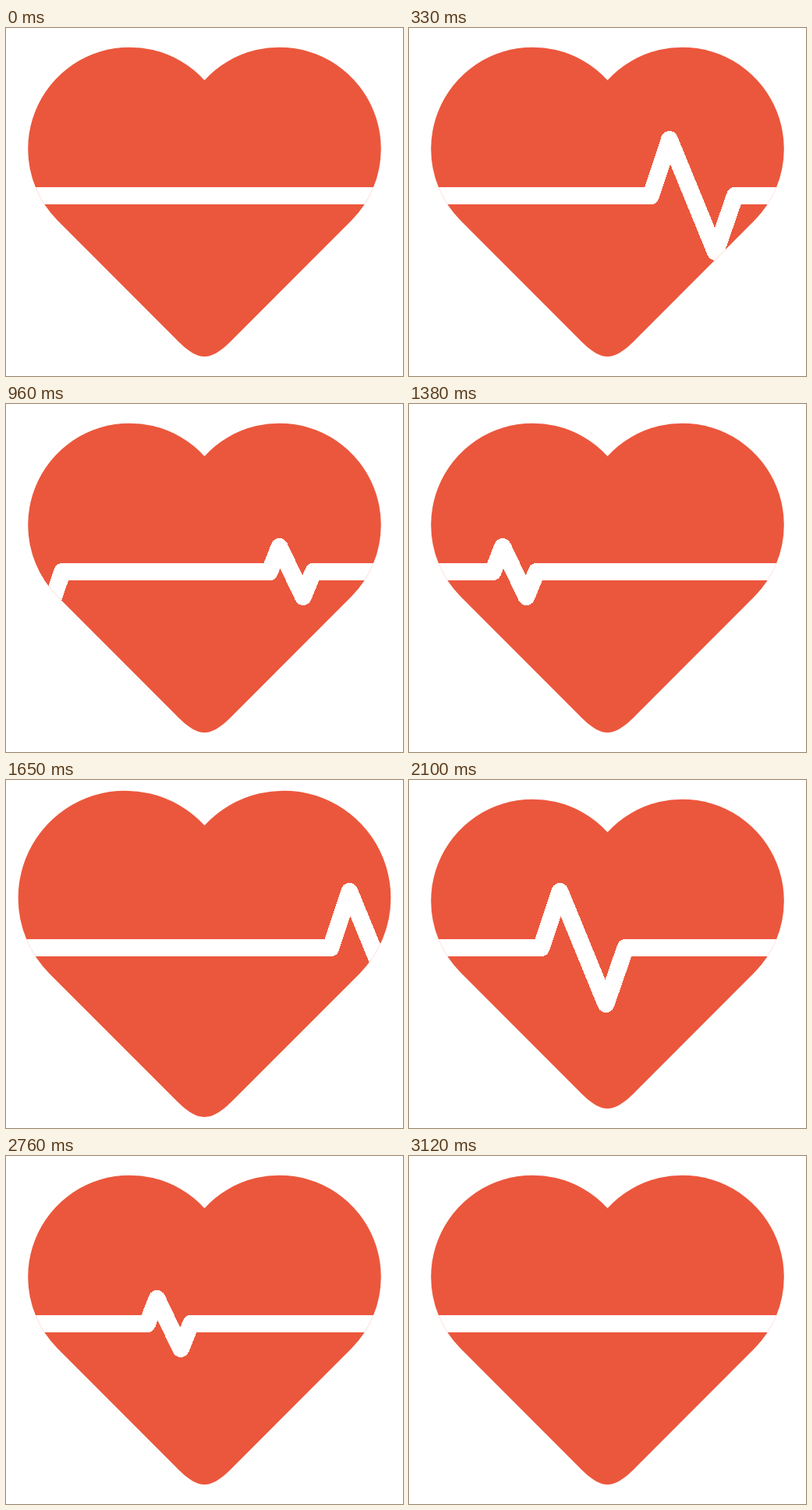
An HTML page that plays this animation: 509x446 px, repeating every 3180 ms.

```html
<!DOCTYPE html>
<html lang="en">
<head>
<meta charset="utf-8">
<title>Heartbeat</title>
<style>
  html, body { margin: 0; width: 100%; height: 100%; overflow: hidden; background: #fff; }
  svg { display: block; width: 100vw; height: 100vh; }
</style>
</head>
<body>
<svg viewBox="0 0 509 446">
  <clipPath id="inside"><use href="#heart"/></clipPath>
  <path id="heart" fill="#eb573c" d="M254.5 66.9
    A130.3 130.3 0 0 1 480.8 155 A130.3 130.3 0 0 1 442.6 247.1 L290 399.8
    C274 416 264 421 254.5 421 C245 421 235 416 219 399.8
    L66.4 247.1 A130.3 130.3 0 0 1 28.2 155 A130.3 130.3 0 0 1 254.5 66.9Z"/>
  <g clip-path="url(#inside)">
    <path id="pulse" fill="none" stroke="#fff" stroke-width="22" stroke-linejoin="round"
      shape-rendering="crispEdges"/>
  </g>
</svg>
<script>
  const STEP = 30, LOOP = 3180, LAST = 104;
  const SPEED = 16.46;                        // pixels per step
  const CENTER = { x: 254.5, y: 223 };
  const BEAT = { period: 25, rise: 3, fall: 4, count: 4, gain: 1 / 9 };

  const heart = document.getElementById('heart');
  const pulse = document.getElementById('pulse');

  // Spikes as [x from the crest, y]
  const BIG = [[-24, 215], [0, 143], [59, 287], [84, 215]];
  const SMALL = [[-12.5, 215], [0, 183], [30.5, 247], [43.5, 215]];
  const spike = (shape, crest) => shape.map(([x, y]) => `L${crest + x} ${y}`).join('');

  const trace = 'M-50 215' + [515, 1345.7].map(x => spike(BIG, x) + spike(SMALL, x + 362.2)).join('') + 'H2400';
  pulse.setAttribute('d', trace);

  function heartScale(step) {
    if (step >= BEAT.period * BEAT.count) return 1;
    const phase = step % BEAT.period;
    const level = phase < BEAT.rise
      ? phase / BEAT.rise
      : Math.max(0, 1 - (phase - BEAT.rise) / BEAT.fall);
    return 1 + BEAT.gain * level;
  }

  function draw(time) {
    // The final step rests on the opening pose
    const step = Math.min(Math.floor((time % LOOP) / STEP), LAST) % LAST;
    const { x, y } = CENTER;
    heart.setAttribute('transform',
      `translate(${x} ${y}) scale(${heartScale(step)}) translate(${-x} ${-y})`);
    pulse.setAttribute('transform', `translate(${-SPEED * step} 0)`);
  }

  let start;
  function tick(now) {
    start ??= now;
    draw(now - start);
    requestAnimationFrame(tick);
  }
  draw(0);
  requestAnimationFrame(tick);
</script>
</body>
</html>
```
